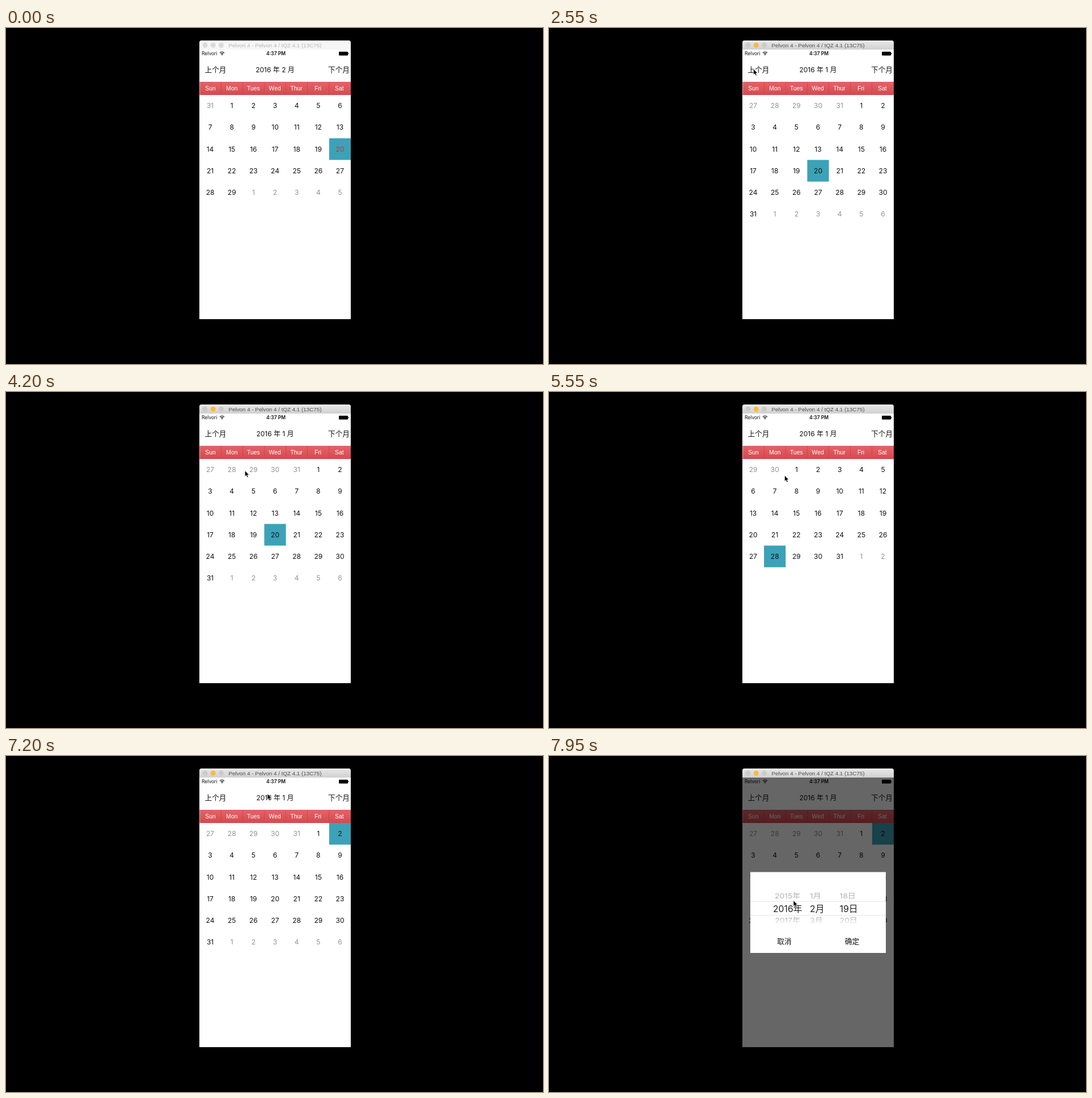
An HTML page that plays this animation: 947x592 px, repeating every 8000 ms.

```html
<!DOCTYPE html>
<html lang="zh">
<head>
<meta charset="utf-8">
<title>Calendar</title>
<style>
  html, body { margin: 0; width: 100%; height: 100%; overflow: hidden; background: #000; }
  svg { display: block; }
  text { font-family: Inter, "Noto Sans CJK SC", "Noto Sans CJK", sans-serif; fill: #111; }
  .bar { font-family: "Liberation Sans", sans-serif; }
</style>
</head>
<body>
<svg id="stage" width="947" height="592" viewBox="0 0 947 592">
  <defs>
    <linearGradient id="chrome" x2="0" y2="1">
      <stop stop-color="#e9e9e9"/><stop offset="1" stop-color="#d0d0d0"/>
    </linearGradient>
    <linearGradient id="red" x2="0" y2="1">
      <stop stop-color="#e36468"/><stop offset="1" stop-color="#d8484e"/>
    </linearGradient>
    <linearGradient id="fade" x2="0" y2="1">
      <stop stop-color="#fff" stop-opacity="0"/><stop offset="1" stop-color="#fff"/>
    </linearGradient>
  </defs>
  <path id="titlebar" d="M341 38V25.5Q341 22 344.500 22H604.500Q608 22 608 25.500V38Z"/>
  <g id="lights"></g>
  <rect x="341" y="38" width="267" height="475" fill="#fff"/>
  <g id="status">
    <g fill="none" stroke="#111" stroke-width="1.200">
      <path d="M377 43.700Q381 40.300 385 43.700M378.600 45.600Q381 43.500 383.400 45.600"/>
    </g>
    <path d="M379.600 46.700Q381 45.600 382.400 46.700L381 48.300Z" fill="#111"/>
    <rect x="587" y="41.700" width="16" height="6.800" rx="1.200" fill="#050505"/>
    <rect x="603.500" y="43.800" width="1" height="2.600" rx=".5" fill="#111"/>
  </g>
  <g id="week"></g>
  <g id="grid"></g>
  <g id="labels"></g>
  <g id="picker"></g>
  <path id="cursor" d="M0 0V10.400L2.400 8.200L4 12L5.900 11.200L4.300 7.600H7.500Z"
        fill="#000" stroke="#fff" stroke-width=".7" stroke-linejoin="round"/>
</svg>
<script>
const LOOP = 8000, STEP = 150, CELL = 38.15, LEFT = 341, TOP = 118;
const el = id => document.getElementById(id);

function add(parent, tag, attrs, content = '') {
  const node = document.createElementNS('http://www.w3.org/2000/svg', tag);
  for (const key in attrs) node.setAttribute(key, attrs[key]);
  node.textContent = content;
  parent.append(node);
  return node;
}

const label = (parent, text, x, y, size, attrs = {}) =>
  add(parent, 'text', { x, y, 'font-size': size, 'text-anchor': 'middle', ...attrs }, text);
const start = { 'text-anchor': 'start' };

// Fixed parts
const lights = [351, 365.3, 379.5].map(cx => add(el('lights'), 'circle', { cx, cy: 30.2, r: 4.5 }));
const caption = label(el('lights'), 'Pelvon 4 - Pelvon 4 / tQZ 4.1 (13C75)', 474.5, 33.7, 9.8, { class: 'bar' });
label(el('status'), 'Relvori', 345, 48.2, 8.5, start);
label(el('status'), '4:37 PM', 476, 48.2, 8.5, { 'font-weight': 600 });

add(el('week'), 'rect', { x: 341.5, y: 95, width: 266.5, height: 23, fill: 'url(#red)' });
add(el('week'), 'path', { d: 'M341.5 95.3H608M341.5 117.6H608', stroke: '#c4474c', 'stroke-width': .6 });
['Sun', 'Mon', 'Tues', 'Wed', 'Thur', 'Fri', 'Sat'].forEach((day, i) => {
  label(el('week'), day, 360.5 + i * 37.9, 110.2, 10.4, { class: 'bar', style: 'fill:#fff' });
  if (i) add(el('week'), 'path', { d: `M${341.5 + i * 38} 95V118`, stroke: '#c4474c', 'stroke-width': .8 });
});

label(el('labels'), '上个月', 369.5, 78.2, 12.7);
label(el('labels'), '下个月', 587, 78.2, 12.7);
const heading = label(el('labels'), '', 474.5, 78, 12);

// Date picker
const picker = el('picker');
add(picker, 'rect', { x: 341, y: 38, width: 267, height: 475, opacity: .6 });
add(picker, 'rect', { x: 355, y: 204.5, width: 239, height: 142.5, fill: '#fff' });
add(picker, 'path', { d: 'M355 256.2H594M355 280.8H594', stroke: '#dcdcdc', 'stroke-width': .8 });
[[247, '2015年', '1月', '18日'], [269, '2016年', '2月', '19日'], [290, '2017年', '3月', '20日']]
  .forEach(([y, year, month, day], row) => {
    const current = row === 1, size = current ? 15.8 : 14;
    const wheel = add(picker, 'g', { transform: `translate(0 ${y}) scale(1 ${current ? 1 : .86})` });
    const style = `fill:${current ? '#222' : '#b0b0b0'}`, base = size * .36;
    label(wheel, year, 420.7, base, size, { style });
    label(wheel, month, 460, base, size, { ...start, style });
    label(wheel, day, 512.5, base, size, { ...start, style });
  });
add(picker, 'rect', { x: 390, y: 285, width: 160, height: 13, fill: 'url(#fade)' });
label(picker, '取消', 415, 330.6, 12.7);
label(picker, '确定', 534.5, 330.6, 12.7);

// [time, year, month, selected cell, heading]
const months = [
  [0, 2016, 2, 20, '2016 年 2 月'],
  [2250, 2016, 1, 24, '2016 年 1 月'],
  [2850, 2015, 12, 21, '2015 年 12 月'],
  [3600, 2016, 1, 24, '2016 年 1 月'],
  [4800, 2015, 12, 29, '2016 年 1 月'],
  [6450, 2016, 1, 6, '2016 年 1 月'],
];

// [time, x, y] of the pointer tip
const path = [
  [450, 604, 280], [1350, 360.5, 73], [2850, 360.5, 72], [3300, 588, 70.5], [3750, 588, 70.5],
  [4200, 421.3, 138.5], [4500, 399, 139], [4950, 399, 139], [5100, 392, 137], [5550, 415.5, 147],
  [6000, 585, 292], [6150, 588, 288.5], [6450, 588, 288.5], [7200, 461, 66.5], [7350, 461, 66.5],
  [7950, 431, 254.5],
];

function drawMonth([, year, month, selected, title]) {
  const grid = el('grid');
  grid.replaceChildren();
  heading.textContent = title;
  const lead = new Date(year, month - 1, 1).getDay();
  const days = new Date(year, month, 0).getDate();
  const cells = Math.ceil((lead + days) / 7) * 7;
  for (let i = 0; i < cells; i++) {
    const date = new Date(year, month - 1, i - lead + 1);
    const x = LEFT + i % 7 * CELL, y = TOP + Math.floor(i / 7) * CELL;
    if (i === selected)
      add(grid, 'rect', { x, y, width: Math.min(CELL, 608 - x), height: CELL, fill: '#3ca2b7' });
    const today = date.getMonth() === 1 && date.getDate() === 20;
    const fill = today ? '#c9352f' : date.getMonth() === month - 1 ? '#111' : '#929292';
    label(grid, date.getDate(), x + CELL / 2, y + 23.3, 12.1, { style: `fill:${fill}` });
  }
}

function pointerAt(t) {
  const next = path.findIndex(p => p[0] >= t);
  if (next < 1) return path[next < 0 ? path.length - 1 : 0].slice(1);
  const [t0, x0, y0] = path[next - 1], [t1, x1, y1] = path[next];
  const k = (t - t0) / (t1 - t0), ease = k * k * (3 - 2 * k);
  return [x0 + (x1 - x0) * ease, y0 + (y1 - y0) * ease];
}

let shown;
function render() {
  const t = Math.floor(performance.now() % LOOP / STEP) * STEP;
  const month = months.findLast(m => m[0] <= t);
  if (month !== shown) drawMonth(shown = month);

  const active = t >= 2100;
  el('titlebar').setAttribute('fill', active ? 'url(#chrome)' : '#f6f6f6');
  caption.style.fill = active ? '#505050' : '#b4b4b4';
  lights.forEach((light, i) =>
    light.setAttribute('fill', !active ? '#dadada' : i === 1 ? '#fdb93c' : '#cbcbcb'));

  picker.setAttribute('visibility', t >= 7350 ? 'visible' : 'hidden');
  el('cursor').setAttribute('visibility', t >= 450 ? 'visible' : 'hidden');
  el('cursor').setAttribute('transform', `translate(${pointerAt(t)})`);
  requestAnimationFrame(render);
}
render();
</script>
</body>
</html>
```
